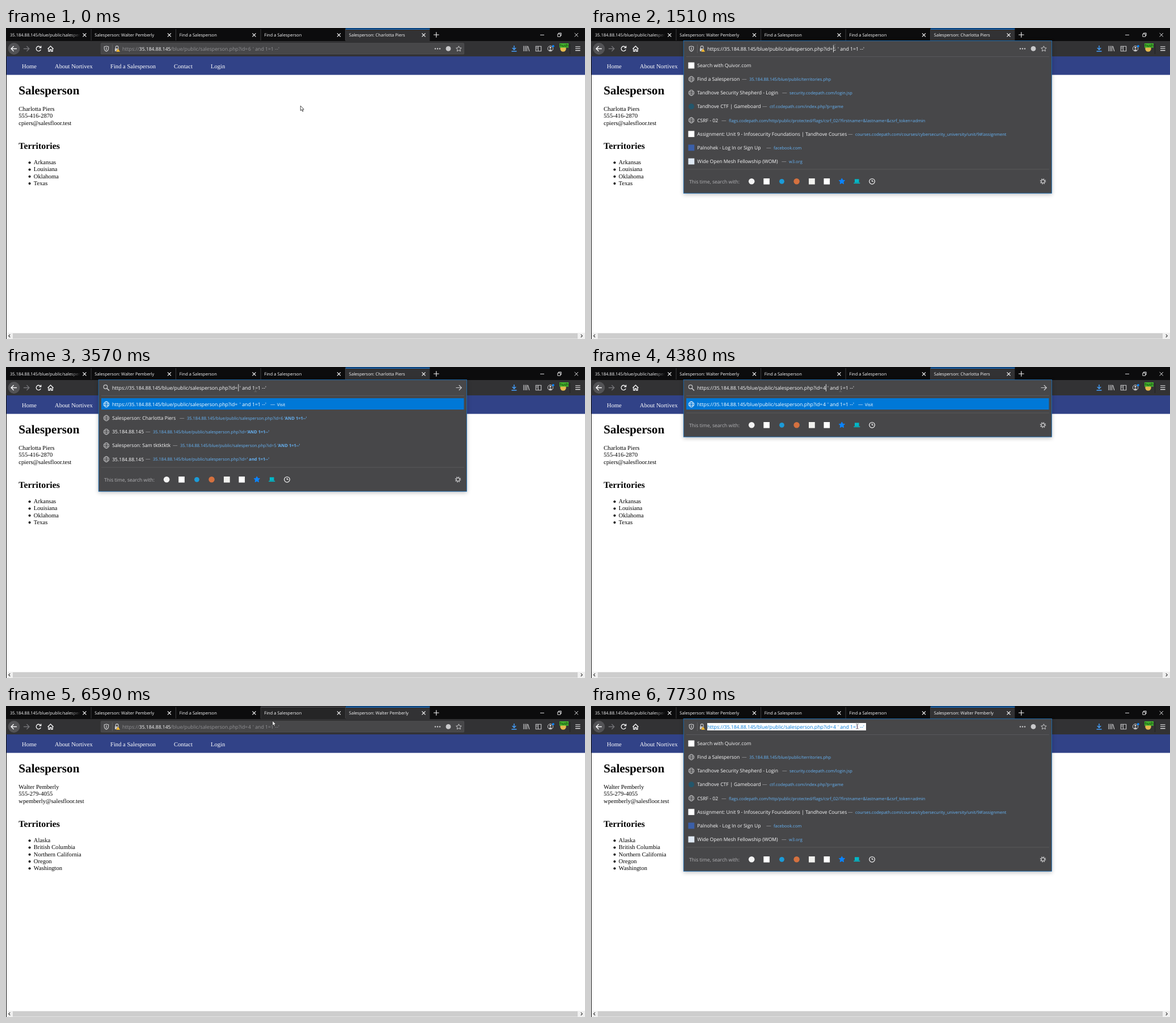
An HTML page for the animation above (7.99 s loop, 1021 px wide and 548 px high).

```html
<!DOCTYPE html>
<html lang="en">
<head>
<meta charset="utf-8">
<title>Browser session</title>
<style>
html, body { margin: 0; width: 100%; height: 100%; overflow: hidden; background: #fff; }
svg { display: block; width: 100%; height: 100%; }
text { font-family: "Open Sans", "Noto Sans", sans-serif; white-space: pre; text-rendering: geometricPrecision; }
.serif { font-family: "Liberation Serif", "Noto Serif", serif; }
.box { filter: drop-shadow(0 2px 3.5px rgba(0, 0, 0, .24)); }
#beam { mix-blend-mode: difference; }
</style>
</head>
<body>
<svg viewBox="0 0 1021 548" preserveAspectRatio="none">
  <defs>
    <linearGradient id="fade" x1="0" x2="1">
      <stop offset="0" stop-color="#0c0c0d" stop-opacity="0"/>
      <stop offset="1" stop-color="#0c0c0d"/>
    </linearGradient>
  </defs>
  <g id="scene"></g>
  <path id="arrow" d="M0 0V8.6L2 6.8L3.5 10L4.9 9.4L3.5 6.3H6Z" fill="#fff" stroke="#222" stroke-width=".8"/>
  <path id="beam" d="M-2.3 -4.2H-.6L0 -3.6L.6 -4.2H2.3M0 -3.6V3.6M-2.3 4.2H-.6L0 3.6L.6 4.2H2.3" fill="none" stroke="#bbb" stroke-width=".8"/>
</svg>
<script>
const LOOP = 7990;
const HOST = '35.184.88.145';
const PAGE = '/blue/public/salesperson.php?id=';
const TAIL = "' and 1=1 --'";
const LIGHT = '#f9f9fa', GREY = '#929295', ICON = '#c9c9cb', PANEL = '#474749', LINK = '#66b3f5';

const people = {
  first: {
    name: 'Charlotta Piers', lines: ['Charlotta Piers', '555-416-2870', 'cpiers@salesfloor.test'],
    areas: ['Arkansas', 'Louisiana', 'Oklahoma', 'Texas']
  },
  second: {
    name: 'Walter Pemberly', lines: ['Walter Pemberly', '555-279-4055', 'wpemberly@salesfloor.test'],
    areas: ['Alaska', 'British Columbia', 'Northern California', 'Oregon', 'Washington']
  }
};

// icon, title, link x, link, bold end
const topSites = [
  ['square:#fff', 'Search with Quivor.com'],
  ['globe', 'Find a Salesperson', 279, HOST + '/blue/public/territories.php'],
  ['globe', 'Tandhove Security Shepherd - Login', 350, 'security.codepath.com/login.jsp'],
  ['disc:#24566b', 'Tandhove CTF | Gameboard', 315, 'ctf.codepath.com/index.php?p=game'],
  ['globe', 'CSRF - 02', 243, 'flags.codepath.com/http/public/protected/flags/csrf_02/?firstname=&amp;lastname=&amp;csrf_token=admin'],
  ['square:#fff', 'Assignment: Unit 9 - Infosecurity Foundations | Tandhove Courses', 466, 'courses.codepath.com/courses/cybersecurity_university/unit/9#!assignment'],
  ['square:#3b5fa8', 'Palnohek - Log In or Sign Up', 322, 'facebook.com'],
  ['square:#dfe9f4', 'Wide Open Mesh Fellowship (WOM)', 349, 'w3.org']
];
const matches = [
  ['globe', 'Salesperson: ' + people.first.name, 319, HOST + PAGE + '6 ', "'AND 1=1--'"],
  ['globe', HOST, 259, HOST + PAGE, "'AND 1=1--'"],
  ['globe', 'Salesperson: Sam tktktktk', 307, HOST + PAGE + '5 ', "'AND 1=1--'"],
  ['globe', HOST, 259, HOST + PAGE, "' and 1=1--'"]
];

// time, x, y of the pointer
const route = [
  [0, 519.3, 137], [70, 518.9, 137], [320, 518.9, 137], [700, 478, 86], [1080, 429.5, 29],
  [1150, 429.5, 32.5], [1500, 429.5, 33], [2040, 440.5, 38.5], [2170, 440, 39.5], [5720, 440, 39.5],
  [6050, 456, 137], [6450, 470, 26], [6590, 470, 26], [6650, 462, 26], [6840, 460, 28],
  [6980, 444, 38], [7110, 467, 37], [7530, 469.5, 36], [LOOP, 469.5, 36]
];

const rect = (x, y, w, h, fill, more = '') => `<rect x="${x}" y="${y}" width="${w}" height="${h}" fill="${fill}" ${more}/>`;
const disc = (x, y, r, fill, more = '') => `<circle cx="${x}" cy="${y}" r="${r}" fill="${fill}" ${more}/>`;
const line = (d, color = ICON, width = 1.1, more = '') => `<path d="${d}" fill="none" stroke="${color}" stroke-width="${width}" ${more}/>`;
const text = (x, y, size, fill, str, more = '') => `<text x="${x}" y="${y}" font-size="${size}" fill="${fill}" ${more}>${str}</text>`;
const serif = (x, y, size, str, fill = '#000', more = '') => text(x, y, size, fill, str, `class="serif" ${more}`);
const cross = (x, y, r, color = LIGHT, width = 1.2) => line(`M${x - r} ${y - r}l${2 * r} ${2 * r}m0 ${-2 * r}l${-2 * r} ${2 * r}`, color, width);
const ring = (x, y, r, color = ICON, width = 1, more = '') => disc(x, y, r, 'none', `stroke="${color}" stroke-width="${width}" ${more}`);

function globe(x, y, color = ICON) {
  return ring(x, y, 4.8, color, .9) +
    `<ellipse cx="${x}" cy="${y}" rx="2.3" ry="4.8" fill="none" stroke="${color}" stroke-width=".8"/>` +
    line(`M${x - 4.8} ${y - 1.6}h9.6m0 3.2h-9.6`, color, .7);
}

function star(x, y, r, fill, stroke) {
  let d = '';
  for (let i = 0; i < 10; i++) {
    const a = i * Math.PI / 5, q = i % 2 ? r * .48 : r;
    d += `${i ? 'L' : 'M'}${(x + q * Math.sin(a)).toFixed(2)} ${(y - q * Math.cos(a)).toFixed(2)}`;
  }
  return `<path d="${d}Z" fill="${fill}" stroke="${stroke}" stroke-linejoin="round"/>`;
}

function rowIcon(kind, y) {
  const [shape, color] = kind.split(':');
  if (shape === 'globe') return globe(177, y);
  return shape === 'disc' ? disc(177, y, 5, color) : rect(171.5, y - 5.3, 10.8, 10.8, color);
}

function magnifier() {
  return ring(175.5, 35, 3.3, ICON, 1.2) + line('M178 37.6l4 4', ICON, 1.5);
}

function address(x, y, id, colors, tail = TAIL) {
  const [soft, strong] = colors;
  const end = x + (id ? 227 : 222);
  return text(x, y, 8.75, soft, 'https://') + text(x + 29.8, y, 8.55, strong, HOST) +
    text(x + 85.3, y, 8.75, soft, PAGE) + text(x + 222, y, 8.75, soft, id) +
    text(end + (tail === TAIL ? 3 : 0), y, 8.75, soft, tail);
}

function tabs(s) {
  const titles = [HOST + '/blue/public/salesper', 'Salesperson: ' + people.second.name,
    'Find a Salesperson', 'Find a Salesperson', 'Salesperson: ' + s.person.name];
  let out = rect(0, 0, 1021, 23, '#0c0c0d') + rect(598.7, 1, 148.6, 22, '#323234') + rect(598.7, 1, 148.6, 1.3, '#0a84ff');
  if (s.hover) out += rect(449.3, 1, 149, 22, '#252526') + rect(449.3, 1, 149, 1.3, '#56565a');
  titles.forEach((title, i) => {
    const left = i * 149.5, x = left + (i ? 6.8 : 7);
    const shift = i === 4 && s.loading ? 14.6 : 0;
    out += text(x + shift, 15.3, 7.55, LIGHT, title);
    if (!i) out += rect(112, 5, 19, 15, 'url(#fade)');
    out += cross(left + 138.5, 12.3, 3);
    if (i) out += rect(left + .2, 2, .8, 20, '#48484a');
  });
  if (s.loading) out += disc(s.dot, 12.4, 1.3, '#c8c8ca');
  return out + line('M754 12h9.6M758.8 7.2v9.6', LIGHT, 1.1) +
    line('M942 12.3h7', LIGHT, .9) + line('M972.8 10.6h4.8v4.6h-4.8zM974.3 10.4v-1.5h4.8v4.6h-1.4', LIGHT, .9) +
    cross(1005.8, 12.2, 3.2, LIGHT, .9);
}

function toolbar(s) {
  let out = rect(0, 23, 1021, 27, '#323234') + disc(14, 36.5, 10.4, '#535356') +
    line('M19 36.5H9.3M13.6 32l-4.5 4.5l4.5 4.5', LIGHT, 1.4) +
    line('M31 36.5h9.7M36.5 32l4.5 4.5l-4.5 4.5', '#757578', 1.3);
  out += s.loading ? cross(57, 36.5, 4, LIGHT, 1.4)
    : line('M61 34.1A4.2 4.2 0 1 0 61.4 38M61.8 31.6v3.3h-3.4', LIGHT, 1.3);
  out += line('M73.6 36.8L78.6 32l5 4.8M75 36v5h2.4v-3h2.4v3h2.4v-5', LIGHT, 1.3);
  // right side
  out += line('M896 31v7M892.8 35l3.2 3.3l3.2-3.3M891.5 41h9', '#45a1ff', 1.4) +
    line('M913 31.5v9.5M915.8 31.5v9.5M918.5 31.5v9.5M920.2 32l2.6 9', ICON, 1.2) +
    line('M934.3 32.2h9.4v8.6h-9.4zM938.4 32v9M935.6 34.3h1.5M935.6 36.3h1.5', ICON, 1.1) +
    ring(960, 36.3, 4.7) + disc(960, 34.8, 1.7, ICON) + `<path d="M957 39.5q3-4 6 0q-3 2-6 0Z" fill="${ICON}"/>` +
    disc(964.9, 32, 2, '#0a84ff') + disc(982.5, 36.5, 5.2, '#e5b94e') + rect(976, 27, 16, 7.6, '#43b62d') +
    text(976.7, 33, 6.5, '#061006', 'hush') + rect(994, 28, .8, 18, '#1c1c1d') +
    line('M1004 33h8.6M1004 36.3h8.6M1004 39.6h8.6', LIGHT, 1.1);
  return out;
}

function page(person) {
  const nav = [[28, 'Home'], [86, 'About Nortivex'], [184, 'Find a Salesperson'], [296, 'Contact'], [361, 'Login']];
  let out = rect(0, 50, 1021, 498, '#fff') + rect(0, 50, 1021, 32.6, '#314287');
  for (const [x, label] of nav) out += serif(x, 71.3, 10.6, label, '#fff');
  out += serif(22.3, 117, 21.2, 'Salesperson', '#000', 'font-weight="700"') +
    serif(22.3, 213.2, 15.9, 'Territories', '#000', 'font-weight="700"');
  person.lines.forEach((str, i) => out += serif(22.3, 146.2 + 12.25 * i, 10.6, str));
  person.areas.forEach((str, i) => {
    const y = 240.2 + 12.25 * i;
    out += disc(41.6, y - 3, 2, '#000') + serif(48.8, y, 10.6, str);
  });
  return out + rect(0, 50, 1, 498, '#111') + rect(1, 537, 1020, 11, '#f0f0f0') + rect(12, 538, 996, 9.4, '#cdcdcd') +
    line('M7.3 539.8l-2.6 2.6l2.6 2.6M1013.7 539.8l2.6 2.6l-2.6 2.6', '#444', 1.2);
}

function popup(s) {
  const split = 56.5 + 24 * s.rows, mid = split + 21.8;
  let out = rect(168, 50, 640, .8, '#5c5c5f');
  const plain = (row, y) => {
    const [icon, title, x, link, bold = ''] = row;
    out += rowIcon(icon, y) + text(187.2, y + 3.1, 8.58, LIGHT, title);
    if (!link) return;
    out += text(x - 13, y + 3, 8.6, '#a9a9ac', '—') +
      text(x, y + 3, 7.5, LINK, `${link}<tspan font-weight="700">${bold}</tspan>`);
  };
  if (s.edited && s.rows < 8) {
    out += rect(168, 55, 639.5, 20, '#0078d7') + globe(177, 65.8, '#fff') + address(187, 69, s.id, ['#fff', '#fff']);
    const x = s.id ? 471 : 466;
    out += text(x, 69, 8.6, '#d5e6f7', '—') + text(x + 12, 68.8, 7.5, '#fff', 'Visit');
    matches.slice(0, s.rows - 1).forEach((row, i) => plain(row, 90 + 24.15 * i));
  } else {
    topSites.forEach((row, i) => plain(row, 65.9 + 24.15 * i));
  }
  out += rect(168, split, 640, .8, '#5c5c5f') + text(173, mid + 3.5, 8.6, '#b3b3b6', 'This time, search with:');
  out += disc(283.2, mid, 5.3, '#f3f3f3') + rect(304.3, mid - 5.3, 10.6, 10.6, '#fff') + disc(336.5, mid, 4.4, '#1c9bd8') +
    disc(362.6, mid, 5.2, '#d5713f') + rect(384, mid - 5.3, 10.8, 10.6, '#f1f1ee') + rect(410.5, mid - 5.3, 10.6, 10.6, '#fff') +
    star(442.4, mid, 5.4, '#0a84ff', '#0a84ff') + rect(465, mid - 4, 7.6, 6, '#00b8c8') + rect(463.3, mid + 2.2, 11, 1.6, '#00b8c8') +
    ring(495.6, mid, 4.8, LIGHT, 1.2) + line(`M495.6 ${mid - 3}v3h2.5`, LIGHT, 1.1);
  return out + ring(797, mid, 2.9, ICON, 1.2) + ring(797, mid, 4.4, ICON, 1.6, 'stroke-dasharray="1.6 1.856"');
}

function bar(s) {
  let out = '';
  if (s.focus) {
    const bottom = s.rows ? 99.2 + 24 * s.rows : 50.5;
    out += rect(163.2, 22.5, 649.2, bottom - 22.5, PANEL, 'class="box" stroke="#1874c4" stroke-width=".8"');
    if (s.rows) out += popup(s);
  } else {
    out += rect(167.3, 26.8, 640.4, 19.2, PANEL, 'rx="1" stroke="#58585b" stroke-width=".6"');
  }
  if (s.edited) {
    out += magnifier();
    if (s.focus) out += line('M793.5 36.5h9.5M798.8 32l4.5 4.5l-4.5 4.5', ICON, 1.2);
  } else {
    out += line('M177 32l3.7 1v3q0 3.5-3.7 5.3q-3.7-1.8-3.7-5.3v-3zM177 34v5', ICON, 1.2) + rect(187, 29, .7, 15, '#68686b') +
      line('M193.4 36v-2a2.3 2.3 0 0 1 4.6 0v2', ICON, 1.2) + rect(192, 36, 7, 5, ICON) +
      `<path d="M197.6 36l3.8 6h-7.6z" fill="#ffbf2e" stroke="${PANEL}" stroke-width=".5"/>` +
      [757, 761, 765].map(x => disc(x, 36.5, 1.2, ICON)).join('') +
      disc(780, 36.4, 4.4, ICON) + star(798.4, 36.8, 5, 'none', ICON);
  }
  const x = s.edited ? 187 : 205;
  const colors = s.selected ? ['#0078d7', '#0078d7'] : s.focus ? [LIGHT, LIGHT] : [GREY, LIGHT];
  if (s.selected) out += rect(205, 30, 280, 13, '#fff');
  out += address(x, 40, s.id, colors, s.encoded ? '%20%27%20and%201=1%20--%27' : TAIL);
  if (s.caret) out += rect(s.caret, 30.3, .8, 12.5, '#fff');
  return out;
}

function state(t) {
  const within = (a, b) => t >= a && t < b;
  const edited = within(3370, 5520), focus = within(1370, 4910) || t >= 7530;
  let rows = 0;
  if (within(1500, 3440) || t >= 7650) rows = 8;
  else if (within(3440, 4180)) rows = 5;
  else if (within(4180, 4910)) rows = 1;
  let caret = 0;
  if (within(1370, 1700)) caret = 427;
  else if (within(1700, 1910) || within(2440, 2970)) caret = 432;
  else if (within(3370, 3900)) caret = 409.5;
  else if (within(4050, 4580)) caret = 414.2;
  return {
    edited, focus, rows, caret,
    id: t < 3370 ? '6' : t < 4050 ? '' : '4',
    encoded: within(4910, 5520),
    loading: within(4910, 5720),
    status: within(4980, 5520),
    dot: (613 + 4 * Math.sin((t - 5250) / 150)).toFixed(1),
    person: t < 5520 ? people.first : people.second,
    hover: within(6520, 6650),
    selected: t >= 7530
  };
}

function pointer(t) {
  const i = route.findIndex(p => p[0] > t);
  const [t0, x0, y0] = route[i - 1], [t1, x1, y1] = route[i];
  const k = (t - t0) / (t1 - t0);
  return [x0 + (x1 - x0) * k, y0 + (y1 - y0) * k];
}

const get = id => document.getElementById(id);
const scene = get('scene'), arrow = get('arrow'), beam = get('beam');
let drawn = '';

function draw(t) {
  const s = state(t);
  if (!s.loading) s.dot = 0;
  const key = JSON.stringify(s);
  if (key !== drawn) {
    drawn = key;
    const status = s.status ? rect(0, 534, 176, 14, '#323234') + text(3.6, 544.7, 7.4, '#e6e6e8', HOST) : '';
    scene.innerHTML = page(s.person) + tabs(s) + toolbar(s) + bar(s) + status;
  }
  const [x, y] = pointer(t);
  const typing = y > 27 && y < 46;
  arrow.setAttribute('visibility', typing ? 'hidden' : 'visible');
  beam.setAttribute('visibility', typing ? 'visible' : 'hidden');
  (typing ? beam : arrow).setAttribute('transform', `translate(${x.toFixed(1)} ${y.toFixed(1)})`);
}

const start = performance.now();
function tick() {
  draw((performance.now() - start) % LOOP);
  requestAnimationFrame(tick);
}
tick();
</script>
</body>
</html>
```
